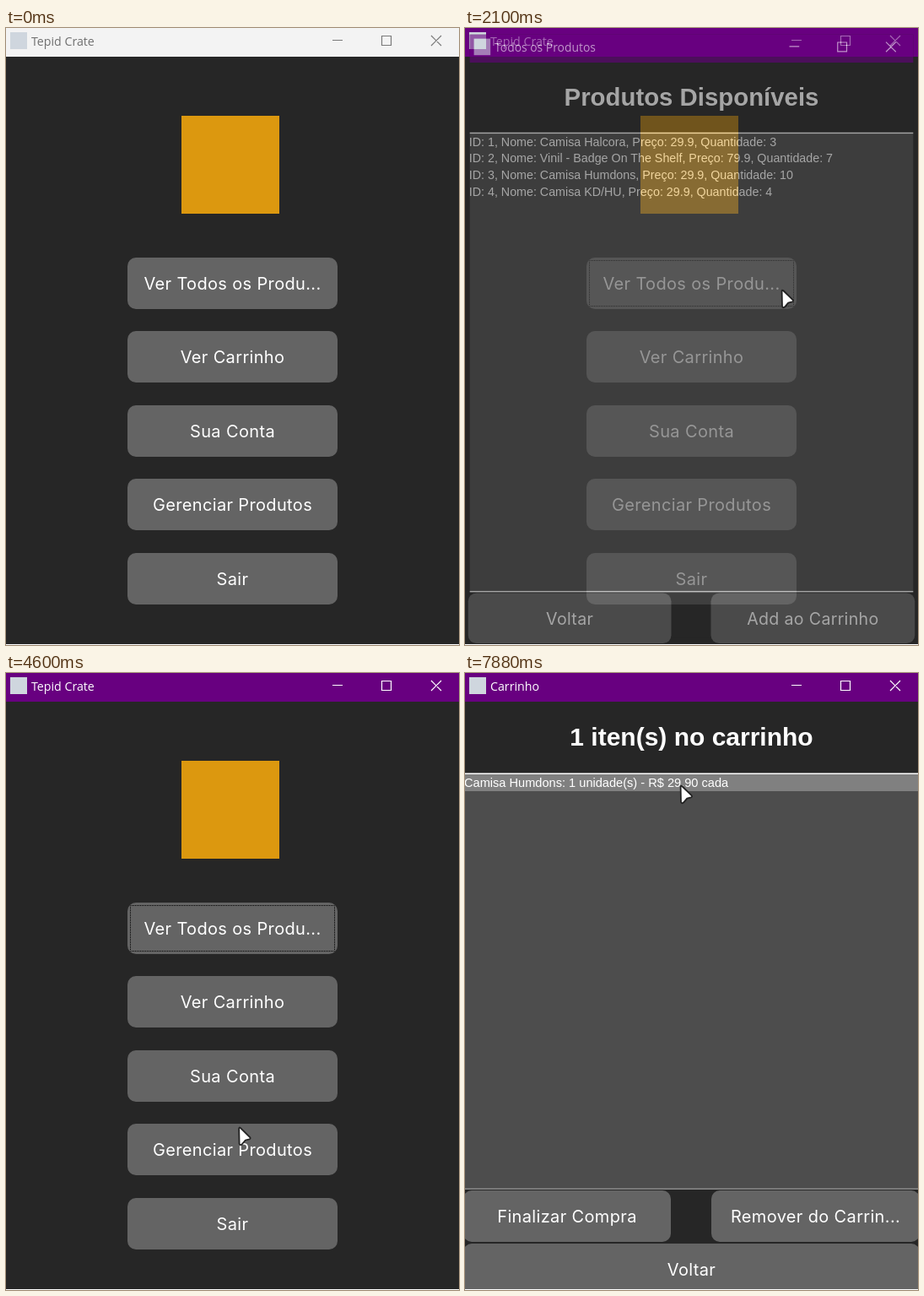
These frames come from a looping animation (537x731 px, 8 s). An HTML page:

```html
<!DOCTYPE html>
<html lang="pt-BR">
<head>
<meta charset="utf-8">
<title>Tepid Crate</title>
<style>
  html, body { margin: 0; width: 100%; height: 100%; overflow: hidden; background: #262626; }
  svg { display: block; width: 537px; height: 731px; }
  text { fill: #fff; white-space: pre; }
  .win { transform-origin: 268.5px 365px; }
  .title { font: 14.2px "Open Sans", sans-serif; }
  .head { font: bold 30px "Liberation Sans", Arial, sans-serif; text-anchor: middle; }
  .row { font: 14.6px "Liberation Sans", Arial, sans-serif; }
  .btn text { font: 20px Inter, sans-serif; letter-spacing: .35px; text-anchor: middle; }
  .face { fill: #646464; }
  .ring { fill: none; stroke: #000; stroke-dasharray: 1 1; stroke-dashoffset: .5; visibility: hidden; }
  .ctl { fill: none; stroke: #fff; stroke-width: 1.2; }
  .bar { fill: #680080; }
  .idle .bar { fill: #f3f3f3; }
  .idle .title { fill: #707070; }
  .idle .ctl { stroke: #7a7a7a; }
  .pressed .face { fill: #bcbcbc; }
  .focused .ring { visibility: visible; }
</style>
</head>
<body>
<svg id="stage" viewBox="0 0 537 731"></svg>
<script>
const LOOP = 8000, STEP = 62.5, BTN_H = 61;

const rect = (x, y, w, h, fill) => `<rect x="${x}" y="${y}" width="${w}" height="${h}" fill="${fill}"/>`;
const rule = (y, fill = '#fff') => rect(0, y, 537, 1.5, fill);
const head = s => `<text class="head" x="268.5" y="86">${s}</text>`;
const row = (s, i) => `<text class="row" x="-1" y="${135 + i * 20}">${s}</text>`;

function button(id, x, y, w, label) {
  return `<g class="btn" id="${id}">
    <rect class="face" x="${x}" y="${y}" width="${w}" height="${BTN_H}" rx="10"/>
    <rect class="ring" x="${x + 3.5}" y="${y + 3.5}" width="${w - 7}" height="${BTN_H - 7}"/>
    <text x="${x + w / 2}" y="${y + 38}">${label}</text></g>`;
}

const pair = (y, [id1, label1], [id2, label2]) =>
  button(id1, -2, y, 246, label1) + button(id2, 292, y, 247, label2);

function win(id, title, body) {
  return `<g class="win" id="${id}">
    ${rect(0, 0, 537, 730, '#262626')}
    <rect class="bar" width="537" height="34"/>
    ${rect(5, 5, 20, 20, '#cfd6de')}
    <text class="title" x="30" y="20.5">${title}</text>
    <path class="ctl" d="M387 14.5h12M445.5 9.5h11v11h-11zM504 9l12 12M516 9l-12 12"/>
    ${body}</g>`;
}

const menuLabels = ['Ver Todos os Produ...', 'Ver Carrinho', 'Sua Conta', 'Gerenciar Produtos', 'Sair'];
const products = [
  ['Camisa Halcora', 29.9, 3],
  ['Vinil - Badge On The Shelf', 79.9, 7],
  ['Camisa Humdons', 29.9, 10],
  ['Camisa KD/HU', 29.9, 4]
];

const menu = win('menu', 'Tepid Crate',
  rect(208, 104, 116, 116, '#dc980f') +
  menuLabels.map((s, i) => button('menu' + i, 144, Math.floor(272 + i * 87.5), 249, s)).join(''));

const list = win('list', 'Todos os Produtos',
  head('Produtos Disponíveis') + rect(0, 120, 537, 554, '#4d4d4d') + rule(118.5) + rule(673.5) +
  products.map(([name, price, n], i) =>
    row(`ID: ${i + 1}, Nome: ${name}, Preço: ${price}, Quantidade: ${n}`, i)).join('') +
  pair(676, ['back', 'Voltar'], ['add', 'Add ao Carrinho']));

const cart = win('cart', 'Carrinho',
  head('1 iten(s) no carrinho') + rect(0, 120, 537, 491, '#4d4d4d') + rule(118.5) + rule(610.5, '#8c8c8c') +
  `<g id="pick">${rect(0, 120, 537, 20, '#808080')}</g>` +
  row('Camisa Humdons: 1 unidade(s) - R$ 29,90 cada', 0) +
  pair(613, ['buy', 'Finalizar Compra'], ['drop', 'Remover do Carrin...']) +
  button('cartBack', -2, 676, 541, 'Voltar'));

const stage = document.getElementById('stage');
stage.innerHTML = menu + list + cart + rect(0, 730, 537, 1, '#fff') +
  `<path id="cursor" fill="#fff" stroke="#222" stroke-width="1.8" stroke-linejoin="round"
    d="M1.6 2.6Q1.7.9 3.2 2L14.6 13.2Q15.8 14.8 13.8 15.4L9.2 16.6L5 21.6Q2.8 23.2 2 20.8Z"/>`;
const $ = id => document.getElementById(id);

const clamp = v => Math.min(1, Math.max(0, v));
const between = (t, a, b) => t >= a && t < b;
const progress = (t, a, b) => clamp((t - a) / (b - a));
const smooth = p => p * p * (3 - 2 * p);

// Pointer glides: start time, end time, target x, target y, sideways bend
const home = [498, 732];
const glides = [
  [440, 1530, 374, 309, 35],
  [2530, 3400, 217, 691, 58],
  [4230, 4930, 290, 400, 19],
  [5540, 6195, 170, 690, -21],
  [6195, 6910, 206, 704, 0],
  [6910, 7720, 254, 132, 55]
];

function pointer(t) {
  let [x, y] = home;
  for (const [from, to, tx, ty, bend] of glides) {
    const e = smooth(progress(t, from, to));
    x += (tx - x) * e + bend * Math.sin(Math.PI * e);
    y += (ty - y) * e;
  }
  return [x, y];
}

function showWin(id, opacity, scale) {
  const s = $(id).style;
  s.visibility = opacity > 0 ? 'visible' : 'hidden';
  s.opacity = opacity;
  s.transform = scale === 1 ? 'none' : `scale(${scale})`;
}

const opening = (id, p) => showWin(id, 1 - (1 - p) ** 2, 1 - .08 * (1 - p) ** 3);
const closing = (id, p) => showWin(id, 1 - p ** 1.7, 1 - .045 * p * p);

function state(id, pressed, focused) {
  $(id).classList.toggle('pressed', pressed);
  $(id).classList.toggle('focused', focused);
}

function draw(t) {
  // Motion is held on a 16 fps beat; clicks use the exact time
  const q = (Math.floor(t / STEP - .36) + .5) * STEP;

  $('menu').classList.toggle('idle', t < 2040);
  state('menu0', between(t, 1790, 1930), between(t, 1790, 5340));
  state('menu1', between(t, 5340, 5480), t >= 5340);
  state('back', t >= 4030, t >= 4030);
  $('pick').style.display = t >= 7820 ? '' : 'none';

  if (q < 4160) opening('list', progress(q, 1990, 2280));
  else closing('list', progress(q, 4160, 4360));
  opening('cart', progress(q, 5540, 5830));

  const [x, y] = pointer(q);
  $('cursor').setAttribute('transform', `translate(${x.toFixed(1)} ${y.toFixed(1)})`);
}

const start = performance.now();
function tick() {
  draw((performance.now() - start) % LOOP);
  requestAnimationFrame(tick);
}
tick();
</script>
</body>
</html>
```
